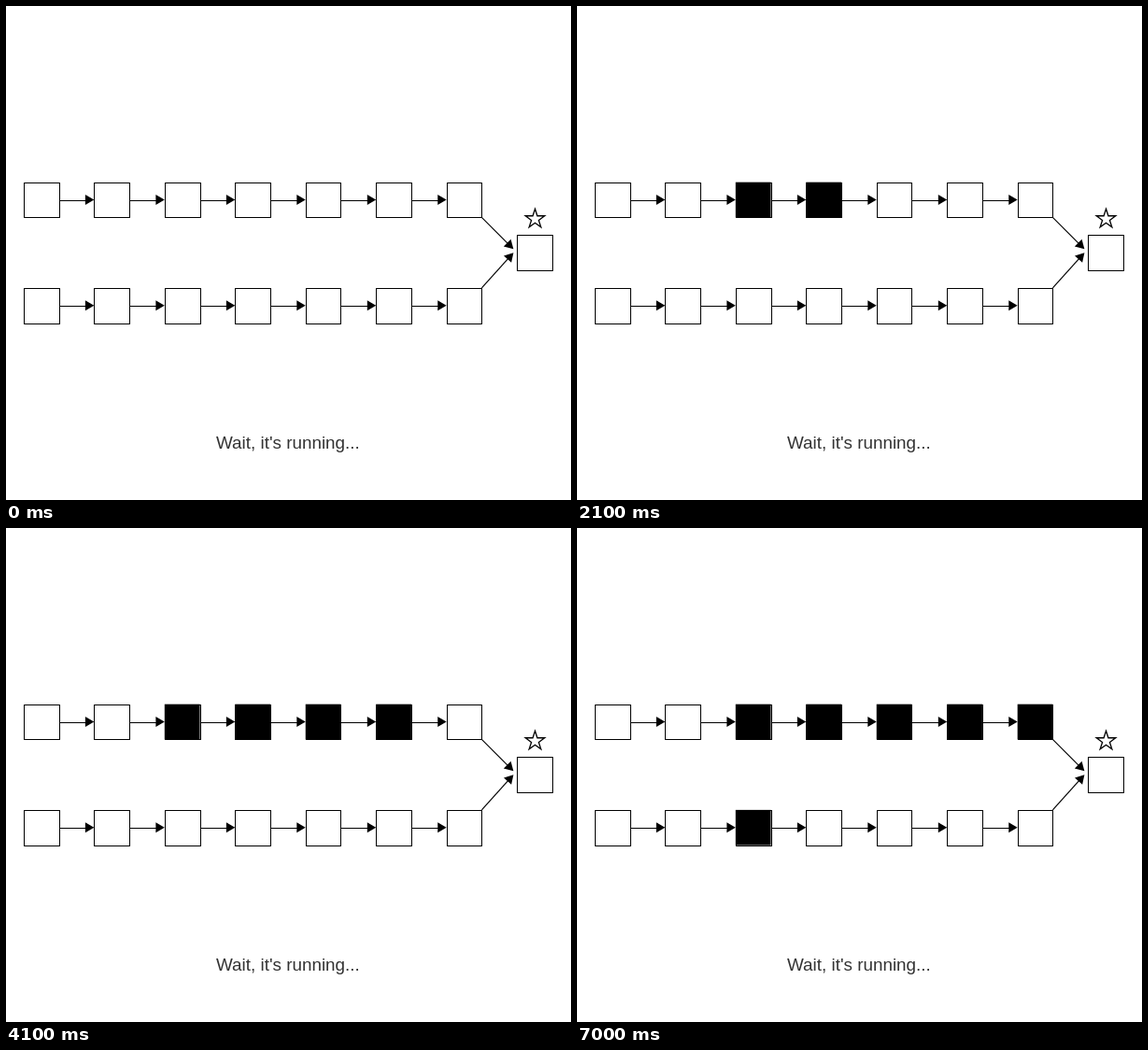
Write an HTML page with a canvas that moves like this. It is 605 by 529 pixels and loops after 8 s.

```html
<!DOCTYPE html>
<html lang="en">
<head>
<meta charset="utf-8">
<style>
  html, body { margin: 0; width: 100%; height: 100%; overflow: hidden; background: #fff; }
  canvas { display: block; }
</style>
</head>
<body>
<canvas id="stage" width="605" height="529"></canvas>
<script>
const ctx = document.getElementById('stage').getContext('2d');
const W = 605, H = 529, LOOP = 8000;
const U = 37.735;            // side of one box, the unit of the layout
const TOP = 5, BOTTOM = 8;   // rows, in units
const COLS = 7;

// When each box turns black
const fills = [
  { at: 500, col: 2, row: TOP },
  { at: 1500, col: 3, row: TOP },
  { at: 2500, col: 4, row: TOP },
  { at: 3500, col: 5, row: TOP },
  { at: 4500, col: 6, row: TOP },
  { at: 7000, col: 2, row: BOTTOM }
];

const colX = col => 0.5 + 2 * col;
const snap = v => Math.round(v * U) + 0.5;

function fillBox(x, y) {
  ctx.fillRect(x * U, y * U, U, U);
}

function outlineBox(x, y) {
  const left = snap(x), top = snap(y);
  ctx.lineWidth = 1;
  ctx.strokeRect(left, top, snap(x + 1) - left, snap(y + 1) - top);
}

function line(x1, y1, x2, y2, width) {
  ctx.lineWidth = width;
  ctx.beginPath();
  ctx.moveTo(x1, y1);
  ctx.lineTo(x2, y2);
  ctx.stroke();
}

function arrowHead(x, y, angle) {
  const len = U / 4, half = len * Math.tan(Math.PI / 6);
  ctx.save();
  ctx.translate(x, y);
  ctx.rotate(angle);
  ctx.beginPath();
  ctx.moveTo(0, 0);
  ctx.lineTo(-len, -half);
  ctx.lineTo(-len, half);
  ctx.fill();
  ctx.restore();
}

function flatArrow(col, row) {
  const y = row + 0.5, tip = colX(col + 1) * U;
  line(snap(colX(col) + 1), snap(y), tip - 5, snap(y), 1);
  arrowHead(tip, y * U, 0);
}

function slantArrow(x1, y1, x2, y2) {
  const angle = Math.atan2(y2 - y1, x2 - x1);
  const tipX = x2 * U, tipY = y2 * U;
  line(x1 * U, y1 * U, tipX - 5 * Math.cos(angle), tipY - 5 * Math.sin(angle), 1.2);
  arrowHead(tipX, tipY, angle);
}

function star(cx, cy, radius) {
  ctx.lineWidth = 1.3;
  ctx.beginPath();
  for (let i = 0; i < 10; i++) {
    const r = i % 2 ? radius * 0.382 : radius;
    const a = i * Math.PI / 5 - Math.PI / 2;
    ctx.lineTo(cx + r * Math.cos(a), cy + r * Math.sin(a));
  }
  ctx.closePath();
  ctx.stroke();
}

function draw(time) {
  ctx.fillStyle = '#fff';
  ctx.fillRect(0, 0, W, H);
  ctx.fillStyle = ctx.strokeStyle = '#000';

  for (const f of fills) if (time >= f.at) fillBox(colX(f.col), f.row);

  for (const row of [TOP, BOTTOM]) {
    for (let col = 0; col < COLS; col++) {
      outlineBox(colX(col), row);
      if (col < COLS - 1) flatArrow(col, row);
    }
  }
  outlineBox(colX(COLS), 6.5);
  slantArrow(13.5, 6, 14.4, 6.9);
  slantArrow(13.5, 8, 14.4, 7);
  star(566.5, 228.1, 10.8);

  ctx.fillStyle = '#333';
  ctx.font = U / 2 + 'px "Liberation Sans", Arial, sans-serif';
  ctx.textAlign = 'center';
  ctx.fillText("Wait, it's running...", 8 * U, 474);
}

const start = performance.now();
function tick() {
  draw((performance.now() - start) % LOOP);
  requestAnimationFrame(tick);
}
tick();
</script>
</body>
</html>
```
